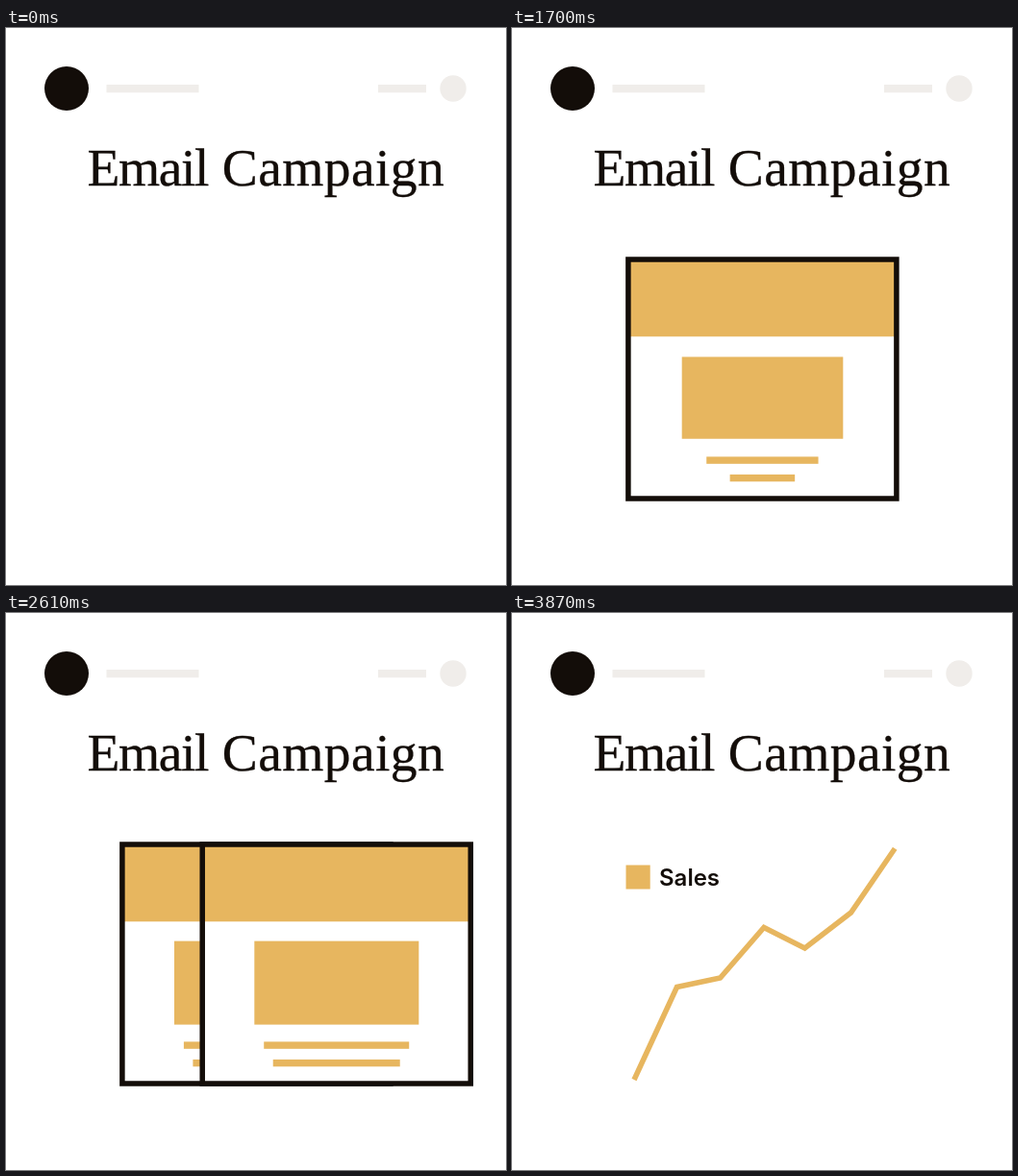
Recreate the animation shown at these times as an HTML page with a canvas. Size 520 by 580 pixels, loop 4.08 s.

```html
<!DOCTYPE html>
<html lang="en">
<head>
<meta charset="utf-8">
<title>Email Campaign</title>
<style>
  html, body { margin: 0; width: 100%; height: 100%; overflow: hidden; background: #fff; }
  canvas { display: block; }
</style>
</head>
<body>
<canvas id="stage" width="520" height="580"></canvas>
<script>
const ctx = document.getElementById('stage').getContext('2d');
const INK = '#130d09', GOLD = '#e7b65f', GREY = '#f0edea', WHITE = '#fff';
const LOOP = 4080, BUILD = 1000, STEP = 70, LAST = 3870;
const SLIDE = 2035, STAGGER = 315, CARDS = 3;
const CX = 260.4, CY = 365.5, W = 279, H = 249, STROKE = 5.5;
const CHART = [[127, 486], [171.5, 389.5], [216.5, 380], [262, 327.5],
               [304.5, 349], [352.5, 312], [398.2, 245.3]];

const clamp = v => Math.max(0, Math.min(1, v));
const span = (t, start, length) => clamp((t - start) / length);
const easeOut = u => 1 - (1 - u) ** 3;

// Cubic Bezier easing with y1 = 0 and y2 = 1
function bezier(x1, x2, u) {
  let lo = 0, hi = 1;
  for (let i = 0; i < 24; i++) {
    const s = (lo + hi) / 2, r = 1 - s;
    if (3 * r * r * s * x1 + 3 * r * s * s * x2 + s ** 3 < u) lo = s; else hi = s;
  }
  return 3 * (1 - lo) * lo * lo + lo ** 3;
}

function box(color, x, y, w, h) {
  ctx.fillStyle = color;
  ctx.fillRect(x, y, w, h);
}

function centered(cx, cy, w, h) {
  if (w > 0 && h > 0) box(GOLD, cx - w / 2, cy - h / 2, w, h);
}

function disc(color, x, y, r) {
  ctx.fillStyle = color;
  ctx.beginPath();
  ctx.arc(x, y, r, 0, Math.PI * 2);
  ctx.fill();
}

function titleWord(word, x, spacing) {
  ctx.letterSpacing = spacing + 'px';
  ctx.fillText(word, x, 164);
  ctx.strokeText(word, x, 164);
}

function drawHeader() {
  disc(INK, 63, 63, 23);
  box(GREY, 104.5, 59, 96, 8.3);
  box(GREY, 387, 59, 50, 8.3);
  disc(GREY, 465, 63, 13.7);
  ctx.save();
  ctx.fillStyle = ctx.strokeStyle = INK;
  ctx.font = '55.5px "Liberation Serif", "Times New Roman", serif';
  ctx.lineWidth = 0.3;
  titleWord('Email', 84.5, -1.4);
  titleWord('Campaign', 224.8, 0.4);
  ctx.restore();
}

function drawOutline(t) {
  const scale = 0.613 + 0.387 * easeOut(span(t, BUILD, 600));
  const perimeter = 2 * (W + H);
  const drawn = perimeter * (0.2825 + 0.7175 * easeOut(span(t, BUILD, 450)));
  const x = W / 2, y = H / 2;
  ctx.save();
  ctx.translate(CX, CY);
  ctx.scale(scale, scale);
  ctx.strokeStyle = INK;
  ctx.lineWidth = STROKE;
  // Both arms grow from a point near the middle of the top edge
  if (drawn < perimeter) {
    ctx.setLineDash([drawn, perimeter - drawn]);
    ctx.lineDashOffset = drawn / 2;
  }
  ctx.beginPath();
  ctx.moveTo(4, -y);
  ctx.lineTo(x, -y);
  ctx.lineTo(x, y);
  ctx.lineTo(-x, y);
  ctx.lineTo(-x, -y);
  ctx.closePath();
  ctx.stroke();
  ctx.restore();
}

function drawCard(t, shift) {
  const grow = (start, length = 400) => easeOut(span(t, start, length));
  ctx.save();
  ctx.translate(shift, 0);
  if (t >= SLIDE) box(WHITE, CX - W / 2, CY - H / 2, W, H);
  box(GOLD, CX - W / 2, CY - H / 2, W, 80.3 * grow(1350, 350));
  const image = grow(1408);
  centered(260.5, 385.1, 171 * image, 87 * image);
  centered(260.4, 450.1, 151 * grow(1545), 7.4);
  centered(260.4, 468.6, 132 * grow(1615), 7.4);
  drawOutline(t);
  ctx.restore();
}

function drawChart(t) {
  box(GOLD, 118.5, 262.5, 25.2, 25);
  ctx.fillStyle = INK;
  ctx.font = '600 24px Inter, "Liberation Sans", sans-serif';
  ctx.fillText('Sales', 153, 284);

  const part = bezier(0.36, 0.25, span(t, 2970, 900));
  if (part <= 0.0001) return;
  const gap = i => Math.hypot(CHART[i + 1][0] - CHART[i][0], CHART[i + 1][1] - CHART[i][1]);
  let left = 0;
  for (let i = 0; i < CHART.length - 1; i++) left += gap(i);
  left *= part;
  ctx.strokeStyle = GOLD;
  ctx.lineWidth = STROKE;
  ctx.beginPath();
  ctx.moveTo(...CHART[0]);
  for (let i = 0; i < CHART.length - 1 && left > 0; i++) {
    const [ax, ay] = CHART[i], [bx, by] = CHART[i + 1];
    const k = Math.min(1, left / gap(i));
    ctx.lineTo(ax + (bx - ax) * k, ay + (by - ay) * k);
    left -= gap(i);
  }
  ctx.stroke();
}

function draw(t) {
  box(WHITE, 0, 0, 520, 580);
  drawHeader();
  if (t < BUILD) return;
  if (t < SLIDE) return drawCard(t, 0);
  drawChart(t);
  for (let i = CARDS - 1; i >= 0; i--) {
    const age = Math.max(0, t - SLIDE - i * STAGGER);
    const shift = 97 * (age / 277) ** 2.4;
    if (shift < 405) drawCard(t, shift);
  }
}

// The motion runs in held steps
function hold(t) {
  if (t < BUILD) return 0;
  return Math.min(LAST, BUILD + Math.floor((t - BUILD) / STEP) * STEP);
}

let origin = null;
function tick(now) {
  if (origin === null) origin = now;
  draw(hold((now - origin + 1) % LOOP));
  requestAnimationFrame(tick);
}
draw(0);
requestAnimationFrame(tick);
</script>
</body>
</html>
```
